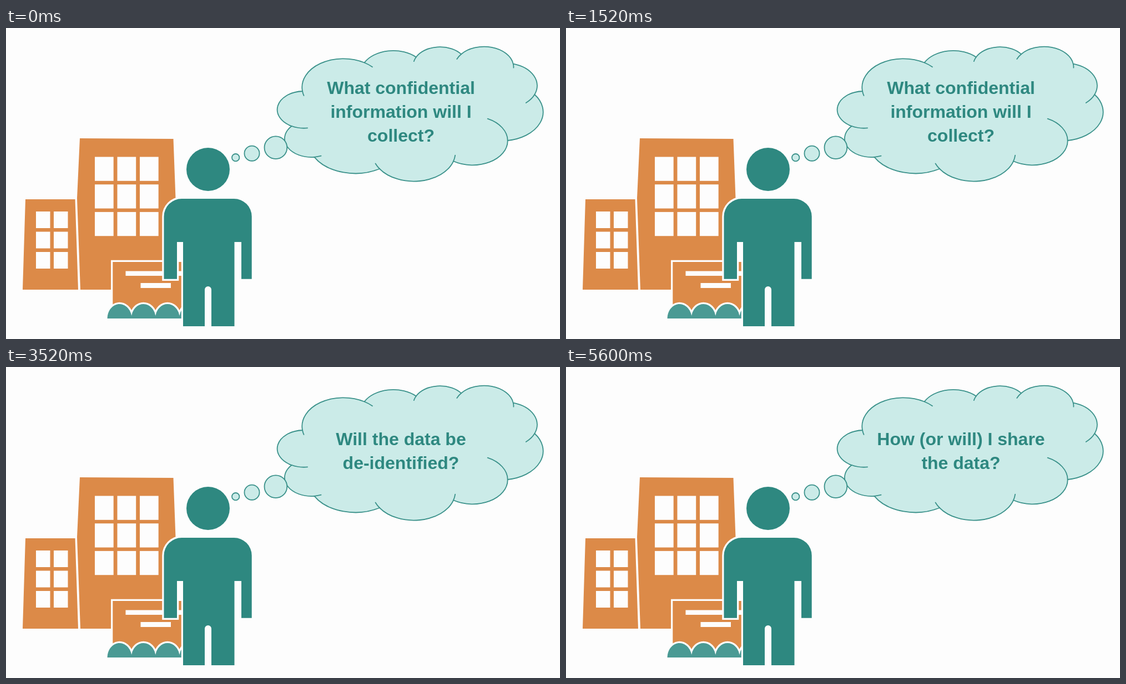
Write an HTML page that moves like this. It is 998x561 px and loops after 6.16 s.

```html
<!DOCTYPE html>
<html lang="en">
<head>
<meta charset="utf-8">
<title>Planning for confidential data</title>
<style>
  html, body { margin: 0; width: 100%; height: 100%; overflow: hidden; background: #fdfdfd; }
  svg { display: block; width: 100%; height: 100%; }
  .building { fill: #dc8a48; }
  .white { fill: #fdfdfd; }
  .person { fill: #2e8880; }
  .bush { fill: #4a9a94; }
  .halo { stroke: #fdfdfd; stroke-width: 6.5; paint-order: stroke; }
  .cloud { fill: #cbebe8; stroke: #3a918a; stroke-width: 1.8; stroke-linecap: round; }
  .ticks { fill: none; }
  text { font: bold 32px "Liberation Sans", Arial, sans-serif; fill: #2e8880; text-anchor: middle; }
</style>
</head>
<body>
<svg viewBox="0 0 998 561">
  <path class="building" d="M35 309H124.5L130 472H30Z"/>
  <path class="building" d="M133 199L301.5 200L305.5 307L301 472H134L128 307Z"/>
  <g id="windows" class="white"></g>
  <path class="building halo" d="M192.3 422H347V515H192.3Z"/>
  <path class="white" d="M215.5 438.5H324V447H215.5ZM242.5 460H297V469H242.5Z"/>
  <path id="bush" class="bush halo"/>
  <circle class="person" cx="364" cy="255" r="39"/>
  <path id="body" class="person halo"/>
  <path id="cloud" class="cloud"/>
  <g id="bubbles" class="cloud"></g>
  <path id="ticks" class="cloud ticks"/>
  <g id="questions"></g>
</svg>
<script>
const LOOP = 6160;
const QUESTIONS = [
  { from: 0, lines: ["What confidential", "information will I", "collect?"] },
  { from: 2640, lines: ["Will the data be", "de-identified?"] },
  { from: 3600, lines: ["How (or will) I share", "the data?"] }
];

// Corners of the cloud, clockwise: x, y, radius of the bump that starts there,
// and the tick in degrees: above zero it extends the bump before, below zero the one after.
const ASPECT = 1.439;
const CORNERS = [
  [534, 114, 51.7, -9], [645.6, 62.5, 41, 14], [738.8, 52.5, 33.5, -14],
  [820, 47.2, 37, -16], [913.7, 64.6, 41, 11], [952.3, 120, 52, 26],
  [903.7, 203, 44, -64], [806, 240.3, 52, -12], [673, 254, 59.4, 12],
  [555.4, 232.8, 33.4, -15], [514.6, 177, 33.4, -35]
];

const byId = id => document.getElementById(id);
const setPath = (id, d) => byId(id).setAttribute("d", d);

function make(tag, attrs, parent) {
  const el = document.createElementNS("http://www.w3.org/2000/svg", tag);
  for (const key in attrs) el.setAttribute(key, attrs[key]);
  return parent.appendChild(el);
}

// A bump is a circular arc between two corners, widened by ASPECT.
function bump([x0, y0, r], [x1, y1]) {
  const ax = x0 / ASPECT, bx = x1 / ASPECT;
  const dx = bx - ax, dy = y1 - y0, chord = Math.hypot(dx, dy);
  const lift = Math.sqrt(r * r - chord * chord / 4) / chord;
  const cx = (ax + bx) / 2 - dy * lift, cy = (y0 + y1) / 2 + dx * lift;
  const at = a => `${(cx + r * Math.cos(a)) * ASPECT} ${cy + r * Math.sin(a)}`;
  return {
    start: Math.atan2(y0 - cy, ax - cx),
    end: Math.atan2(y1 - cy, bx - cx),
    at,
    arcTo: a => `A${r * ASPECT} ${r} 0 0 1 ${at(a)}`
  };
}

function drawCloud() {
  const n = CORNERS.length;
  const bumps = CORNERS.map((corner, i) => bump(corner, CORNERS[(i + 1) % n]));
  let outline = "M" + bumps[0].at(bumps[0].start);
  let ticks = "";
  bumps.forEach((b, i) => {
    outline += b.arcTo(b.end);
    const tick = CORNERS[i][3] * Math.PI / 180;
    const owner = tick < 0 ? b : bumps[(i + n - 1) % n];
    const from = tick < 0 ? b.start + tick : owner.end;
    ticks += "M" + owner.at(from) + owner.arcTo(from + Math.abs(tick));
  });
  setPath("cloud", outline + "Z");
  setPath("ticks", ticks);
}

function drawBubbles() {
  for (let i = 0; i < 3; i++) {
    const cx = 413.7 + 22.5 * i + 6.8 * i * i;
    make("circle", { cx, cy: 233.7 - 6 * i - 1.5 * i * i, r: 6.7 + 6.85 * i }, byId("bubbles"));
  }
}

function drawWindows(cols, x, y, dx, dy, width, height) {
  for (let row = 0; row < 3; row++)
    for (let col = 0; col < cols; col++)
      make("rect", { x: x + col * dx, y: y + row * dy, width, height }, byId("windows"));
}

function drawBush() {
  const step = 43.2, rx = 22, ry = 26, base = 524, left = 182.5;
  const valley = base - ry * Math.sqrt(1 - (step / 2 / rx) ** 2);
  let d = `M${left} ${base}`;
  for (let i = 1; i <= 4; i++)
    d += `A${rx} ${ry} 0 0 1 ${left + rx + step * (i - 0.5)} ${valley}`;
  setPath("bush", d + `V${base}Z`);
}

function drawBody() {
  const left = 284.5, right = 442.7, top = 308, hand = 452.7, foot = 538, round = 32;
  setPath("body", `M${left + round} ${top}H${right - round}a${round} ${round} 0 0 1 ${round} ${round}
    V${hand}H424V386H411.5V${foot}H370V472a6 6 0 0 0 -12 0V${foot}H319V386H308V${hand}
    H${left}V${top + round}a${round} ${round} 0 0 1 ${round} ${-round}Z`);
}

function drawQuestion({ lines }) {
  const group = make("g", {}, byId("questions"));
  const first = 162.3 - (lines.length - 1) * 21.5;
  lines.forEach((line, i) => {
    make("text", { x: 711.5, y: first + i * 43 }, group).textContent = line;
  });
  return group;
}

drawWindows(2, 54, 331, 32, 36.5, 25.5, 30);
drawWindows(3, 160, 232.5, 40.5, 49.7, 33.7, 43.3);
drawBush();
drawBody();
drawCloud();
drawBubbles();
const groups = QUESTIONS.map(drawQuestion);

const origin = performance.now();
function render(now) {
  const time = Math.max(0, now - origin) % LOOP;
  const current = QUESTIONS.findLastIndex(q => time >= q.from);
  groups.forEach((g, i) => g.setAttribute("visibility", i === current ? "visible" : "hidden"));
  requestAnimationFrame(render);
}
render(origin);
</script>
</body>
</html>
```
